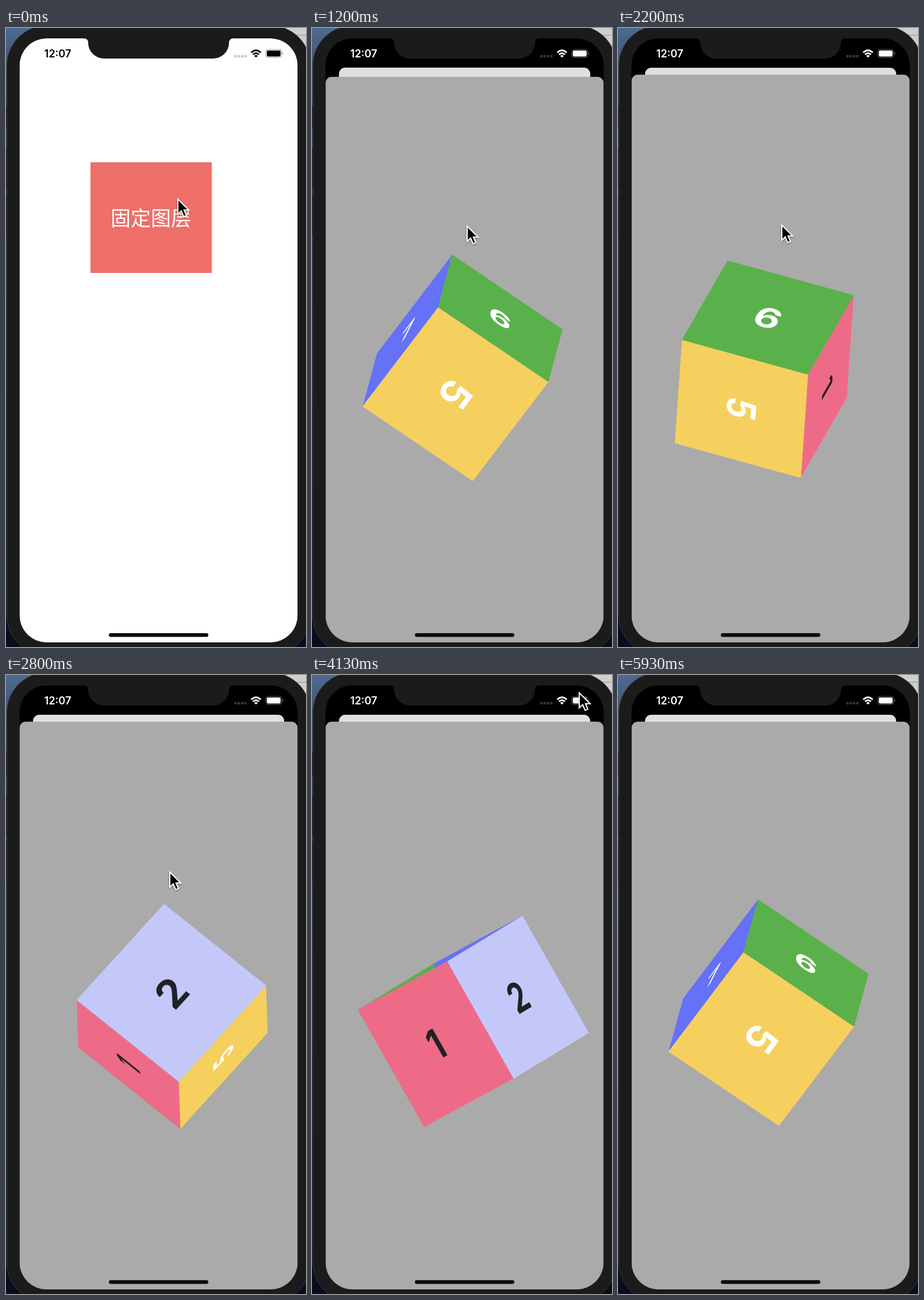
These frames come from a looping animation (522 px wide and 1074 px high, 5990 ms). An HTML page:

```html
<!DOCTYPE html>
<html lang="zh-CN">
<head>
<meta charset="utf-8">
<title>Cube</title>
<style>
  html, body { margin: 0; width: 522px; height: 1074px; overflow: hidden; background: #0b0c1c; }
  svg { display: block; }
  text { text-anchor: middle; font-family: Inter, "Liberation Sans", sans-serif; }
  .digit { font-size: 73px; font-weight: 700; }
  .clock { font-size: 18.3px; font-weight: 600; }
  .label { font: 35px "Noto Sans CJK SC", "Noto Sans CJK", sans-serif; }
</style>
</head>
<body>
<svg width="522" height="1074" viewBox="0 0 522 1074">
  <defs>
    <linearGradient id="wall" x2="0" y2="1">
      <stop offset="0" stop-color="#4d6a92"/>
      <stop offset=".08" stop-color="#3d4c68"/>
      <stop offset=".3" stop-color="#2b3049"/>
      <stop offset="1" stop-color="#0a0c1e"/>
    </linearGradient>
    <clipPath id="screen"><rect x="23.5" y="18" width="484" height="1048" rx="47"/></clipPath>
    <filter id="shadow" x="-50%" y="-50%" width="200%" height="200%">
      <feDropShadow dx="0" dy="1.5" stdDeviation="1.5" flood-opacity=".4"/>
    </filter>
  </defs>

  <rect width="522" height="1074" fill="url(#wall)"/>
  <path d="M440 0H522V60H440Z" fill="#cfcfcf"/>
  <path d="M500 12.5H522" stroke="#8f8f8f"/>
  <path d="M0 135h3v39h-3zM0 208h3v71h-3zM0 290h3v70h-3z" fill="#151515"/>
  <rect x="1.5" y="-4" width="528" height="1092" rx="69" fill="#1b1b1b" stroke="#3b3b3e"/>

  <g clip-path="url(#screen)">
    <rect width="522" height="1074"/>
    <g id="home">
      <rect id="page" x="23.5" y="18" width="484" height="1048" fill="#fff"/>
      <rect x="147" y="233" width="211" height="192" fill="#ee7069"/>
      <text class="label" x="252" y="342.5" fill="#fff">固定图层</text>
      <rect id="dim" x="23.5" y="18" width="484" height="1048"/>
    </g>
    <g id="sheet">
      <rect x="23.5" y="81" width="484" height="1100" rx="11" fill="#aaa"/>
      <g id="cube" transform="translate(265.3 573.4)"></g>
    </g>
    <rect x="179" y="1050" width="173" height="6.5" rx="3.2" fill="#0c0c0c"/>
  </g>
  <path d="M135 17H396V18Q388 18 388 26A28 27 0 0 1 360 53H171A28 27 0 0 1 143 26Q143 18 135 18Z" fill="#1b1b1b"/>

  <g id="status" fill="currentColor">
    <text class="clock" x="90" y="51">12:07</text>
    <g opacity=".21">
      <circle cx="399.3" cy="49" r="2.4"/><circle cx="405" cy="49" r="2.4"/>
      <circle cx="410.8" cy="49" r="2.4"/><circle cx="416.5" cy="49" r="2.4"/>
    </g>
    <g fill="none" stroke="currentColor" stroke-width="2.8">
      <path d="M426.8 42.6Q435 35 443.2 42.6"/>
      <path d="M429.8 46Q435 41.4 440.2 46"/>
    </g>
    <path d="M435 51.3L431.9 48.2Q435 45.6 438.1 48.2Z"/>
    <rect x="452" y="37.2" width="27.6" height="14" rx="4" fill="none" stroke="currentColor" opacity=".4"/>
    <rect x="453.8" y="39" width="24" height="10.4" rx="2.4"/>
    <path d="M481 41.8Q483.4 44.2 481 46.6Z" opacity=".5"/>
  </g>

  <path id="cursor" d="M0 0V26L6 20.5L10.3 30.3L15 28.3L10.8 18.7H19Z" stroke="#fff" stroke-width="2" filter="url(#shadow)"/>
</svg>
<script>
const $ = id => document.getElementById(id);
const LOOP = 5990, EDGE = 233.6, DROP = 31.5;
const len = Math.hypot(.3, 1, .7), AXIS = [.3 / len, 1 / len, .7 / len];

// time, angle in degrees
const SPIN = [[500, -82], [1200, 130.7], [2200, 456.4], [3330, 774.9], [4130, 1029.8], [5000, 1294.9], [5930, 1570.7]];
// time, x, y
const POINTER = [[0, 299, 297], [60, 299, 297], [130, 295, 313], [260, 295, 313], [330, 292, 318], [530, 292, 318],
  [1000, 270, 344], [1300, 270, 344], [2100, 285, 342], [3900, 285, 342], [3970, 486, 33], [4130, 465, 31]];

// digit, fill, ink, right vector, down vector
const FACES = [
  ["1", "#ee6b88", "#202124", [1, 0, 0], [0, 1, 0]],
  ["2", "#c4c8f9", "#202124", [0, 0, -1], [0, 1, 0]],
  ["5", "#f5d05e", "#fff", [1, 0, 0], [0, 0, -1]],
  ["6", "#5ab14b", "#fff", [0, 0, 1], [0, 1, 0]],
  ["7", "#6571f6", "#fff", [-1, 0, 0], [0, 1, 0]]
].map(([digit, fill, ink, right, down]) => {
  const el = document.createElementNS("http://www.w3.org/2000/svg", "g");
  const half = EDGE / 2 + .2;
  el.innerHTML = `<rect x="${-half}" y="${-half}" width="${2 * half}" height="${2 * half}" fill="${fill}"/>
    <text class="digit" y="26.5" fill="${ink}">${digit}</text>`;
  return { el, right, down, normal: cross(right, down) };
});

function cross(a, b) {
  return [a[1] * b[2] - a[2] * b[1], a[2] * b[0] - a[0] * b[2], a[0] * b[1] - a[1] * b[0]];
}

function rotate(v, angle) {
  const c = Math.cos(angle), s = Math.sin(angle), w = cross(AXIS, v);
  const dot = v.reduce((sum, x, i) => sum + x * AXIS[i], 0);
  return v.map((x, i) => c * x + s * w[i] + (1 - c) * dot * AXIS[i]);
}

function track(keys, t) {
  let i = 0;
  while (i < keys.length - 2 && t >= keys[i + 1][0]) i++;
  const [a, b] = [keys[i], keys[i + 1]];
  const k = Math.max(0, Math.min(1, (t - a[0]) / (b[0] - a[0])));
  return a.slice(1).map((x, j) => x + (b[j + 1] - x) * k);
}

function drawCube(angle) {
  for (const f of FACES) {
    const r = rotate(f.right, angle), d = rotate(f.down, angle);
    const c = rotate(f.normal.map((x, i) => x * EDGE / 2 + (i === 1 ? DROP : 0)), angle);
    f.depth = c[2];
    f.el.setAttribute("transform", `matrix(${[r[0], r[1], d[0], d[1], c[0], c[1]].map(x => x.toFixed(4))})`);
  }
  FACES.sort((a, b) => a.depth - b.depth);
  $("cube").append(...FACES.map(f => f.el));
}

function draw(t) {
  // critically damped spring for the sheet
  const w = 11 * Math.max(0, t - 500) / 1000;
  const rest = t >= 1330 ? 0 : (1 + w) * Math.exp(-w), p = 1 - rest;
  const scale = 1 - .097 * p;
  $("home").setAttribute("transform", `translate(265.5 ${18 + 51 * p}) scale(${scale}) translate(-265.5 -18)`);
  $("page").setAttribute("rx", 47 - 35 * p);
  $("dim").setAttribute("rx", 47 - 35 * p);
  $("dim").setAttribute("opacity", .125 * p);
  $("sheet").setAttribute("transform", `translate(0 ${985 * rest})`);
  const g = Math.round(255 * p);
  $("status").style.color = `rgb(${g},${g},${g})`;

  drawCube(track(SPIN, t)[0] * Math.PI / 180);

  $("cursor").setAttribute("transform", `translate(${track(POINTER, t)})`);
  const shown = t < 2900 || (t >= 3970 && t < 4200);
  $("cursor").setAttribute("visibility", shown ? "visible" : "hidden");
}

const start = performance.now();
function tick() {
  draw((performance.now() - start) % LOOP);
  requestAnimationFrame(tick);
}
tick();
</script>
</body>
</html>
```
